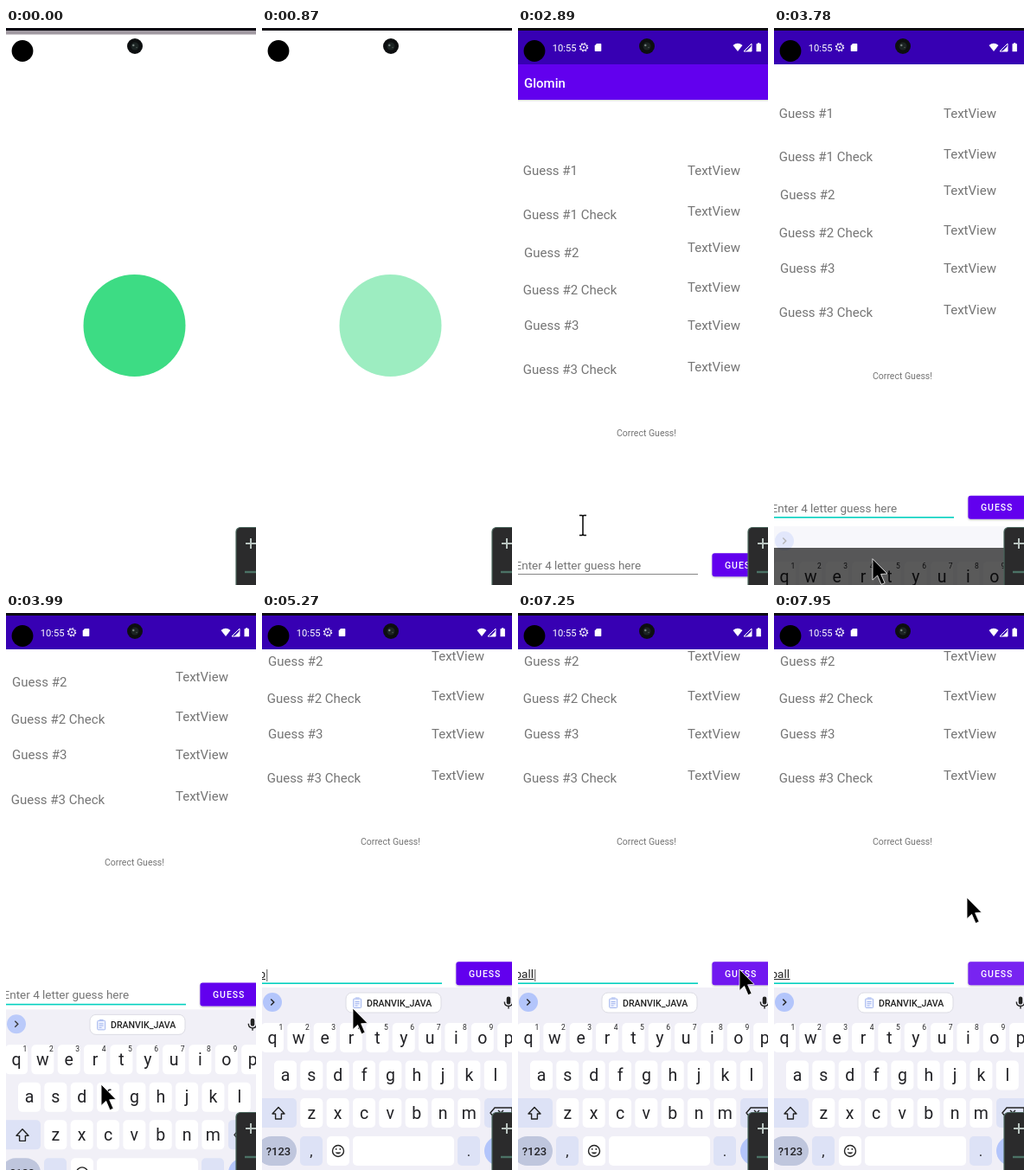
Recreate the animation shown at these times as an HTML page. Size 289 px wide and 644 px high, loop 8 s.

```html
<!DOCTYPE html>
<html lang="en">
<head>
<meta charset="utf-8">
<title>Word guessing app</title>
<style>
  html, body { margin: 0; width: 100%; height: 100%; overflow: hidden; background: #fff; }
  svg { display: block; width: 100vw; height: 100vh; font-family: Roboto, "Liberation Sans", sans-serif; }
  text { white-space: pre; }
  .mid { text-anchor: middle; }
  .medium { font-weight: 500; }
</style>
</head>
<body>
<svg viewBox="0 0 289 644">
  <defs>
    <filter id="soft" x="-20%" y="-40%" width="140%" height="200%">
      <feDropShadow dx="0" dy="1" stdDeviation=".8" flood-opacity=".28"/>
    </filter>
  </defs>
  <rect width="289" height="644" fill="#fff"/>
  <rect id="strip" y="3" width="289" height="4.5" fill="#a19aa2"/>
  <circle id="badge" cx="148.5" cy="344" r="59" fill="#3ddc84"/>

  <g id="app">
    <g id="page">
      <rect y="83" width="289" height="1.5" fill="#000" opacity=".12"/>
      <rect y="41" width="289" height="42" fill="#6200ee"/>
      <text class="medium" x="7" y="69" font-size="15" fill="#fff">Glomin</text>
      <g id="labels" font-size="15" fill="#757575"></g>
      <text class="mid" x="148.5" y="472" font-size="10.5" fill="#757575">Correct Guess!</text>
      <text id="entry" x="-3.5" y="626" font-size="13.5"></text>
      <rect id="compose" x="0" y="627" height="1" fill="#222"/>
      <rect id="caret" y="616" width="1" height="14" fill="#555"/>
      <rect id="line" y="631" width="208" height="1" fill="#858585"/>
      <rect id="focus" y="631.4" width="208" height="1.6" fill="#03d0bf"/>
      <rect id="button" x="224.4" y="607.2" width="67" height="27" rx="3" fill="#6200ee" filter="url(#soft)"/>
      <rect id="press" x="224.4" y="607.2" width="67" height="27" rx="3" fill="#fff"/>
      <text class="medium" x="239" y="624.7" font-size="10.5" letter-spacing=".94" fill="#fff">GUESS</text>
    </g>
    <rect y="3" width="289" height="39" fill="#3700b3"/>
    <g fill="#fff">
      <text x="39.8" y="26.5" font-size="11.2">10:55</text>
      <circle cx="76" cy="22.3" r="4.6" fill="none" stroke="#fff" stroke-width="1.2" stroke-dasharray="1.8 1.8"/>
      <circle cx="76" cy="22.3" r="3.6" fill="none" stroke="#fff"/>
      <circle cx="76" cy="22.3" r="1.1"/>
      <path d="M91 18h4.5q.8 0 .8.8v7.4q0 .8-.8.8h-6q-.8 0-.8-.8v-5.7z"/>
      <path d="M248.5 20q5.5-4.4 11 0L254 27z"/>
      <path d="M270 18v9h-9z" fill="none" stroke="#fff"/>
      <path d="M270 21v6h-6z"/>
      <path d="M277 17.3h2.4v1h1.5v8.9h-5.4v-8.9h1.5z"/>
    </g>
  </g>

  <g id="keys">
    <rect id="board" y="433" width="289" height="215" fill="#f0eff7"/>
    <g id="chevron">
      <circle cx="12" cy="450" r="11" fill="#b3c5fb"/>
      <path d="M10.3 446.5l3.5 3.5-3.5 3.5" fill="none" stroke="#222" stroke-width="1.4"/>
    </g>
    <g id="chip">
      <rect x="97" y="439" width="110" height="23" rx="7" fill="#fff" stroke="#dcdce4"/>
      <rect x="105.7" y="446" width="9" height="10.5" rx="1" fill="#eef2ff" stroke="#a3b6ee"/>
      <path d="M108 445h4.5M107.6 449.5h5M107.6 451.7h5M107.6 454h3" stroke="#a3b6ee"/>
      <text class="medium" x="121" y="454.8" font-size="10.6" fill="#222">DRANVIK_JAVA</text>
      <rect x="282.7" y="443.5" width="4.6" height="9" rx="2.3" fill="#222"/>
      <path d="M280.3 449.5q0 5 4.7 5t4.7-5M285 454.5v3" fill="none" stroke="#222" stroke-width="1.4"/>
    </g>
    <g id="caps"></g>
    <path d="M19 571.5l7 7.5h-3.6v6h-6.8v-6H12z" fill="none" stroke="#222" stroke-width="1.4" stroke-linejoin="round"/>
    <path d="M264 578l5-6h20v12h-20zM273 575l6 6m0-6l-6 6" fill="none" stroke="#222" stroke-width="1.4"/>
    <g fill="none" stroke="#222" stroke-width="1.4">
      <circle cx="88" cy="622" r="6.5"/>
      <path d="M84.5 623.5q3.5 4 7 0z" fill="#222" stroke="none"/>
      <path d="M85.7 619v1.7M90.3 619v1.7"/>
    </g>
  </g>
  <rect id="shade" y="601" width="289" height="43" fill="#000"/>

  <rect x="-1" y="-1" width="291" height="4" fill="#0d0b12"/>
  <circle cx="19" cy="26.5" r="12.4" fill="#000"/>
  <circle cx="149" cy="21" r="9" fill="#0d0f10"/>
  <circle cx="149" cy="21" r="4.5" fill="#1c2423"/>
  <circle cx="147.3" cy="20" r="1.2" fill="#77827f"/>
  <circle cx="151" cy="22.5" r=".8" fill="#4b5553"/>

  <rect x="266" y="577.5" width="40" height="80" rx="5" fill="#2b2b2c" stroke="#48645a" stroke-width="1.2"/>
  <path d="M277 596h14M283 590v12" stroke="#b9c4c0" stroke-width="2"/>
  <path d="M276 629h14" stroke="#4b7265" stroke-width="2.4"/>

  <path id="beam" d="M71 563.5h3l1 1 1-1h3M75 564v22M71 586.5h3l1-1 1 1h3" fill="none" stroke="#000" stroke-width="1.5"/>
  <path id="arrow" d="M0 0v24.5l5.6-5.2 4.5 10.4 4-1.7-4.5-10.2 7.4-.5z" fill="#000" stroke="#fff" stroke-width=".8"/>
</svg>
<script>
const LOOP = 8000;
const $ = id => document.getElementById(id);
const clamp = v => Math.min(1, Math.max(0, v));
const span = (t, a, b) => clamp((t - a) / (b - a));
const easeOut = p => 1 - (1 - p) ** 3;
const mix = (a, b, p) => a + (b - a) * p;
const set = (id, attrs) => {
  for (const k in attrs) $(id).setAttribute(k, attrs[k]);
};
const show = (id, on) => set(id, { opacity: +on });

function add(parent, tag, attrs, text) {
  const el = document.createElementNS("http://www.w3.org/2000/svg", tag);
  for (const k in attrs) el.setAttribute(k, attrs[k]);
  if (text) el.textContent = text;
  $(parent).append(el);
}

// Guess rows: left x, left baseline, right baseline
[
  [5.7, 170, 170], [5.7, 220.5, 217], [7, 264.5, 259],
  [5.8, 308, 305], [7, 349, 349], [5.7, 400.3, 397]
].forEach(([x, left, right], i) => {
  const name = "Guess #" + (1 + (i >> 1)) + (i % 2 ? " Check" : "");
  add("labels", "text", { x, y: left }, name);
  add("labels", "text", { x: 196, y: right }, "TextView");
});

// Keyboard
function cap(x, y, w, fill, rx = 5) {
  add("caps", "rect", { x, y, width: w, height: 34, rx, fill });
}
function glyph(x, y, size, s) {
  add("caps", "text", { x, y, "font-size": size, class: "mid", fill: "#222226" }, s);
}
[["qwertyuiop", 12, 474], ["asdfghjkl", 27, 517.5], ["zxcvbnm", 57.3, 561]].forEach(([row, x0, y], r) => {
  [...row].forEach((ch, i) => {
    const x = x0 + i * 30.35;
    cap(x - 13, y, 26, "#fff");
    glyph(x, y + 23.5, 19.5, ch);
    if (!r) glyph(x + 10, y + 8, 8.5, String((i + 1) % 10));
  });
});
const tint = "#dde2f6";
cap(-6, 561, 46, tint);
cap(257, 561, 46, tint);
cap(-6, 605, 46, "#bfc6dd", 17);
cap(44, 605, 26, tint);
cap(75, 605, 26, "#fff");
cap(105, 605, 117, "#fff");
cap(226, 605, 26, tint);
cap(257, 605, 60, "#b3c5fb", 17);
add("caps", "text", { x: 19, y: 627, "font-size": 13, class: "mid medium", fill: "#222226" }, "?123");
glyph(57, 628, 17, ",");
glyph(239, 628, 17, ".");

// Pointer route: time, x, y
const route = [
  [2960, 100, 596], [3030, 125, 616], [3230, 125, 616], [3580, 114, 614], [3780, 114, 614],
  [4260, 105, 457], [6400, 105, 457], [6410, 127, 438], [6800, 195, 424], [7180, 256, 412],
  [7400, 256, 412], [7950, 223, 329]
];
function pointer(t) {
  const i = route.findIndex(p => p[0] > t);
  if (i === 0) return route[0].slice(1);
  if (i < 0) return route[route.length - 1].slice(1);
  const a = route[i - 1], b = route[i], p = span(t, a[0], b[0]);
  return [mix(a[1], b[1], p), mix(a[2], b[2], p)];
}

const typing = [[5270, "b"], [5610, "ba"], [5680, "bal"], [5750, "ball"]];
const ends = { b: 4, ba: 11.4, bal: 14.7, ball: 18 };

function render(t) {
  set("strip", { opacity: 1 - easeOut(span(t, 70, 670)) });
  set("badge", { opacity: t < 870 ? 1 : t < 960 ? 0.5 : 0 });
  set("app", { opacity: t < 1140 ? 0 : mix(0.85, 1, span(t, 1140, 1420)) });

  const open = t >= 3780;
  const rise = easeOut(span(t, 3780, 4260));
  set("page", { transform: `translate(0 ${open ? -mix(65.5, 204, rise) : 0})` });
  set("keys", { transform: `translate(0 ${144 * (1 - rise)})`, opacity: +open });
  set("board", { opacity: mix(0.5, 1, rise) });
  set("chevron", { opacity: mix(0.3, 1, rise) });
  show("chip", t >= 3990);
  set("shade", { opacity: open ? 0.65 * (1 - span(t, 3780, 3920)) : 0 });

  const typed = typing.filter(k => t >= k[0]).pop();
  const word = typed ? typed[1] : "";
  $("entry").textContent = word || "Enter 4 letter guess here";
  set("entry", { fill: word ? "#222" : "#757575" });
  const end = word ? ends[word] : 0;
  set("compose", { width: t >= 5950 ? end + 0.5 : Math.min(end, 16) });
  const blinkOff = (t >= 6750 && t < 7250) || t >= 7750;
  set("caret", { x: end + 1.3, opacity: +(word !== "" && !blinkOff) });

  const focus = easeOut(span(t, 3230, 3440));
  set("line", { opacity: 1 - focus });
  set("focus", { opacity: focus });
  set("press", { opacity: 0.14 * span(t, 7110, 7320) });

  show("beam", t >= 2890 && t < 2960);
  const [x, y] = pointer(t);
  set("arrow", { transform: `translate(${x} ${y})`, opacity: +(t >= 2960) });
}

function tick() {
  render(performance.now() % LOOP);
  requestAnimationFrame(tick);
}
tick();
</script>
</body>
</html>
```
